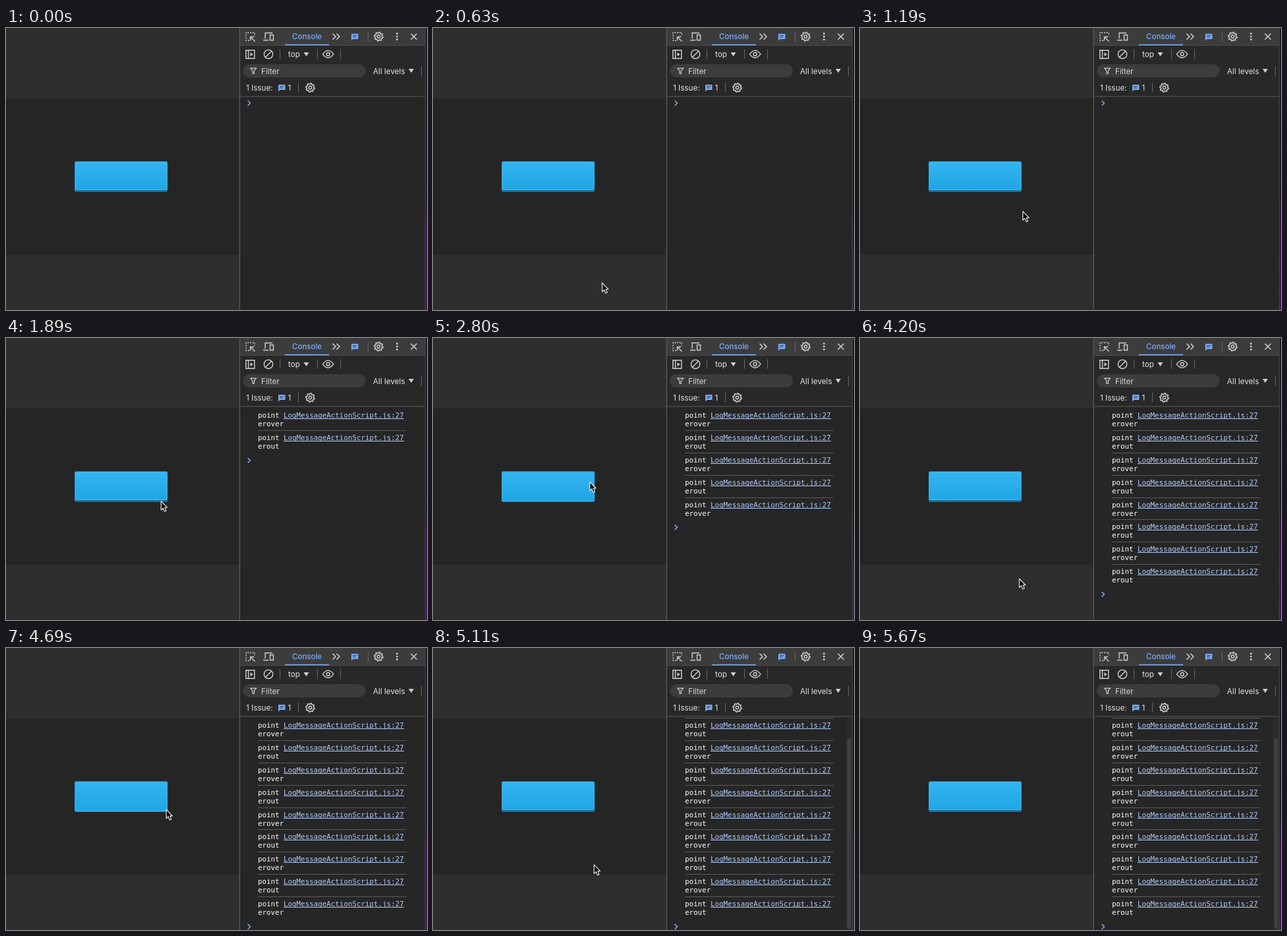
An HTML page with a canvas for the animation above (5.74 s loop, 640 px wide and 428 px high).

```html
<!DOCTYPE html>
<html lang="en">
<head>
<meta charset="utf-8">
<title>Pointer events in the console</title>
<style>
  html, body { margin: 0; width: 100%; height: 100%; overflow: hidden; background: #262626; }
  canvas { display: block; }
</style>
</head>
<body>
<canvas id="stage" width="640" height="428"></canvas>
<script>
const ctx = document.getElementById('stage').getContext('2d');
const LOOP = 5740, STEP = 70, ROW = 33.88, VISIBLE_ROWS = 9;
const BUTTON_BOTTOM = 246;
const ICON = '#d0d0d0', BLUE = '#7cacf8', LINK = '#b2cdfc', LINE = '#5a5a5a';
const UI = 'Inter, Roboto, sans-serif';
const MONO = '"DejaVu Sans Mono", "Liberation Mono", monospace';

// Where the pointer turns around: time and height.
const turns = [
  [140, 432], [1700, 229], [2160, 279], [2380, 226], [2590, 279], [2800, 218],
  [3290, 386], [3780, 222], [4200, 365], [4830, 229], [5400, 434]
];

function pointerAt(t) {
  const next = turns.findIndex(([time]) => time >= t);
  if (next < 1) return null;
  const [t0, y0] = turns[next - 1], [t1, y1] = turns[next];
  const ease = (1 - Math.cos(Math.PI * (t - t0) / (t1 - t0))) / 2;
  const x = 230 + 0.0028 * t + 0.02 * Math.max(0, 1875 - t);
  return { x, y: y0 + (y1 - y0) * ease };
}

const isOver = t => (pointerAt(t)?.y ?? Infinity) < BUTTON_BOTTOM;

// Every crossing of the button's edge logs one message.
function messageCount(t) {
  let count = 0;
  for (let s = STEP; s <= t; s += STEP) {
    if (isOver(s) !== isOver(s - STEP)) count++;
  }
  return count;
}

function rect(x, y, w, h, color) {
  ctx.fillStyle = color;
  ctx.fillRect(x, y, w, h);
}

function pill(x, y, w, h, r, color) {
  ctx.beginPath();
  ctx.roundRect(x, y, w, h, r);
  ctx.fillStyle = color;
  ctx.fill();
}

function text(s, x, y, color = '#e3e3e3', font = `11.7px ${UI}`) {
  ctx.font = font;
  ctx.fillStyle = color;
  ctx.fillText(s, x, y);
}

function stroke(d, color = ICON, width = 1.4) {
  ctx.strokeStyle = color;
  ctx.lineWidth = width;
  ctx.stroke(new Path2D(d));
}

function fill(d, color = ICON) {
  ctx.fillStyle = color;
  ctx.fill(new Path2D(d));
}

function ring(x, y, r) {
  ctx.beginPath();
  ctx.arc(x, y, r, 0, Math.PI * 2);
  ctx.strokeStyle = ICON;
  ctx.lineWidth = 1.4;
  ctx.stroke();
}

function gear(x, y) {
  ctx.beginPath();
  for (let i = 0; i < 32; i++) {
    const a = (i + 0.5) * Math.PI / 16;
    const r = i % 4 < 2 ? 6.7 : 5.2;
    ctx.lineTo(x + r * Math.cos(a), y + r * Math.sin(a));
  }
  ctx.closePath();
  ctx.strokeStyle = ICON;
  ctx.lineWidth = 1.5;
  ctx.stroke();
  ring(x, y, 2.2);
}

function bubble(x, y) {
  pill(x, y, 10.5, 8, 1, BLUE);
  fill(`M${x} ${y + 7}v3.500l3-3z`, BLUE);
  rect(x + 2, y + 2.2, 6.5, 1, '#2b3a55');
  rect(x + 2, y + 4.5, 5, 1, '#2b3a55');
}

const separator = (x, y) => rect(x, y - 7, 1, 15, '#666');
const dropArrow = (x, y) => fill(`M${x} ${y}h8l-4 6z`);
const chevron = (x, y, r, color) =>
  stroke(`M${x} ${y - r}l${r} ${r}l${-r} ${r}`, color, 1.5);

function drawPage() {
  rect(0, 0, 355, 428, '#2e2e2e');
  rect(0, 107, 355, 237, '#252525');
}

function drawTabs() {
  rect(356, 0, 282, 26, '#3c3c3c');
  rect(356, 26, 282, 1, '#4b4b4b');
  rect(424, 24.7, 67, 1.6, BLUE);
  ctx.setLineDash([2, 1.8]);
  stroke('M370 19h-5v-12h13v5');
  ctx.setLineDash([]);
  stroke('M378.5 20.5l-6-6M371.5 19v-5.500h5.500');
  stroke('M394 16v-8.500h11M391 18.500h8M401.500 10.500h5v8h-5z');
  text('Console', 435, 17, BLUE, `500 11.5px ${UI}`);
  chevron(496.5, 13, 4.5, ICON);
  chevron(502.5, 13, 4.5, ICON);
  bubble(525, 8.7);
  separator(550, 13);
  gear(566.5, 13);
  for (let i = -1; i <= 1; i++) pill(593, 11.6 + i * 4.5, 2.8, 2.8, 1.4, ICON);
  stroke('M615.5 8.5l9 9M624.5 8.5l-9 9', ICON, 1.5);
}

function drawFilters() {
  rect(356, 27, 282, 77, '#282828');
  stroke('M364.700 33.700h13v12.600h-13zM368.500 34v12');
  fill('M371.500 37l4 3l-4 3z');
  ring(399, 39.8, 6.7);
  stroke('M394.300 44.600l9.400-9.600');
  separator(416, 39);
  text('top', 429, 44);
  dropArrow(452.5, 37);
  separator(473, 39);
  stroke('M481.500 39.700Q489.500 28.500 498 39.700Q489.500 50.900 481.500 39.700z');
  ring(489.7, 39.7, 2.5);
  separator(508, 39);

  pill(360, 55, 187, 20, 10, '#3c3c3c');
  stroke('M371.800 61.200h8.600l-3.200 4v4h-2.200v-4z', ICON, 1.2);
  text('Filter', 388, 69.5, '#d6d6d6');
  text('All levels', 558, 69.5);
  dropArrow(612, 62);
  separator(631, 65);

  text('1 Issue:', 365, 95);
  bubble(414, 86);
  text('1', 428.5, 95);
  separator(444, 90);
  gear(462.5, 90.5);
  rect(356, 103.5, 282, 1, '#666');
}

function drawEdges() {
  rect(354.5, 0, 1.5, 428, '#555');
  rect(637, 0, 1, 428, '#484848');
  const glow = ctx.createLinearGradient(0, 0, 0, 428);
  glow.addColorStop(0, '#141a22');
  glow.addColorStop(0.6, '#1d1428');
  glow.addColorStop(0.7, '#360f4c');
  glow.addColorStop(1, '#430f5c');
  rect(638, 0, 2, 428, glow);
}

function drawMessage(index, y) {
  const font = `10.85px ${MONO}`;
  if (index > 0) rect(383, Math.round(y - 11), 226, 1, LINE);
  text('point', 383, y + 4, '#fff', font);
  text(index % 2 ? 'erout' : 'erover', 383, y + 17, '#fff', font);
  text('LogMessageActionScript.js:27', 422, y + 4, LINK, font);
  rect(422, y + 5, 183, 1, LINK);
}

function drawConsole(count) {
  const scroll = Math.max(0, count - VISIBLE_ROWS) * ROW;
  ctx.save();
  ctx.beginPath();
  ctx.rect(356, 104.5, 281, 324);
  ctx.clip();
  rect(356, 104, 281, 324, '#262626');
  for (let i = 0; i < count; i++) {
    drawMessage(i, Math.round(117 + i * ROW - scroll));
  }
  chevron(367.5, count ? 118 + count * ROW - scroll : 114, 3.8, BLUE);
  if (scroll) {
    rect(628, 104, 9, 324, '#2b2b2b');
    pill(629.5, 137, 6, 289, 3, '#404040');
  }
  ctx.restore();
}

function drawButton(hovered) {
  const bottom = hovered ? 248 : 246;
  pill(104, 202, 142, 47, 3, hovered ? '#1b83b6' : '#14709c');
  const shade = ctx.createLinearGradient(0, 203, 0, bottom);
  shade.addColorStop(0, '#33b5f1');
  shade.addColorStop(1, '#20a5e4');
  pill(105, 203, 140, bottom - 203, 2, shade);
  ctx.beginPath();
  ctx.roundRect(105.5, 203.5, 139, bottom - 204, 2);
  ctx.strokeStyle = hovered ? '#36b5ef' : '#48bdf4';
  ctx.lineWidth = 1;
  ctx.stroke();
}

function drawPointer({ x, y }) {
  ctx.save();
  ctx.translate(x + 0.5, y + 0.3);
  const arrow = 'M0 0V13.400L3 10.600L5.200 15.800L7.700 14.700L5.500 9.700H9.300z';
  fill(arrow, '#080808');
  ctx.lineJoin = 'round';
  stroke(arrow, '#f4f4f4', 1.1);
  ctx.restore();
}

function draw(t) {
  const pointer = pointerAt(t);
  drawPage();
  drawTabs();
  drawFilters();
  drawConsole(messageCount(t));
  drawEdges();
  drawButton(isOver(t));
  if (pointer) drawPointer(pointer);
}

const start = performance.now();
function tick() {
  const t = (performance.now() - start) % LOOP;
  draw(Math.floor(t / STEP) * STEP);
  requestAnimationFrame(tick);
}
tick();
</script>
</body>
</html>
```
